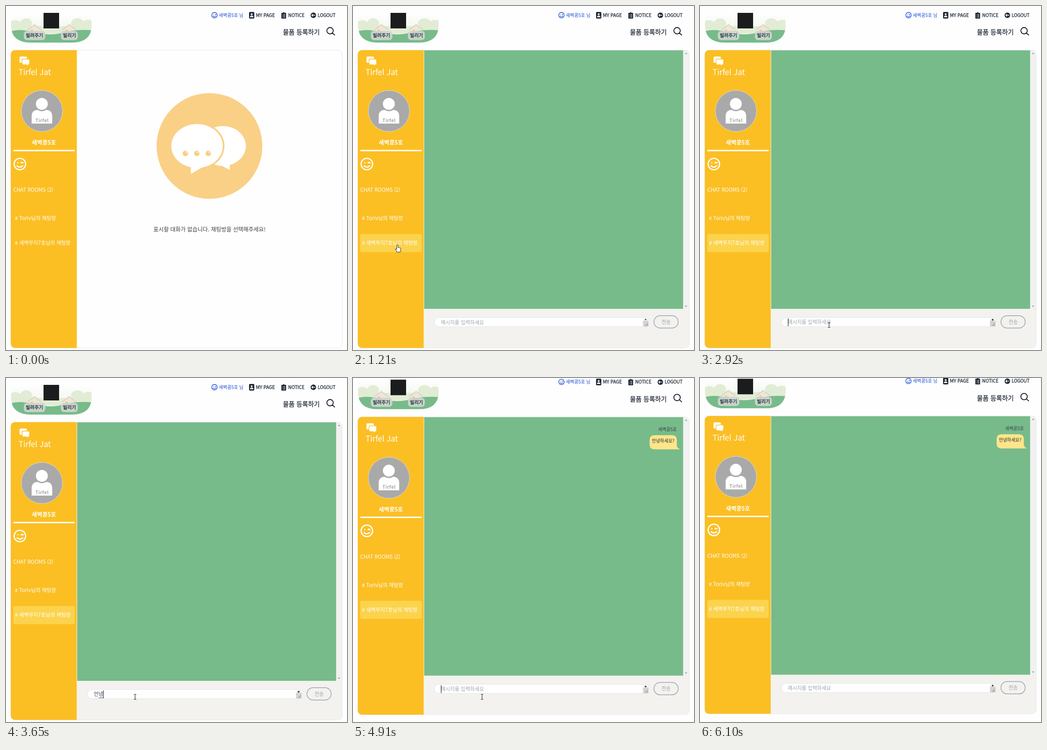
Recreate the animation shown at these times as an HTML page. Size 745 by 752 pixels, loop 8 s.

```html
<!DOCTYPE html>
<html lang="ko">
<head>
<meta charset="utf-8">
<title>Chat room</title>
<style>
html, body { margin: 0; width: 100%; height: 100%; overflow: hidden; background: #fefefe; }
svg { display: block; width: 100vw; height: 100vh; }
text { font-family: "Noto Sans CJK KR", "Noto Sans KR", sans-serif; white-space: pre; }
.medium { fill: #1f2937; stroke: #1f2937; stroke-width: .3px; }
.nav { font-size: 10px; }
.tab { font-size: 10.3px; text-anchor: middle; }
.side { font-size: 11.2px; fill: #fff; }
.field { font-size: 11px; }
.line { fill: none; stroke-linecap: round; stroke-linejoin: round; }
</style>
</head>
<body>
<svg viewBox="0 0 745 752">
  <defs>
    <clipPath id="banner"><path d="M11 15H187V44Q186 80 143 80H55Q12 80 11 44Z"/></clipPath>
    <clipPath id="card"><rect x="10.5" y="96.5" width="723.5" height="651" rx="9"/></clipPath>
    <linearGradient id="sky" x2="0" y2="1">
      <stop offset="0" stop-color="#fefefe"/><stop offset="1" stop-color="#e9f2dd"/>
    </linearGradient>
    <g id="house">
      <path d="M-11 10V0L0-8 11 0V10Z" fill="#f0e6d6"/>
      <path d="M-15 1 0-10 15 1" fill="none" stroke="#ddd5c8" stroke-width="2.5"/>
      <rect x="-8" y="1" width="5" height="5" fill="#f3c08d"/>
    </g>
    <g id="wink" class="line">
      <circle r="12.5"/>
      <path d="M-6 4Q0 9.2 6 4M2.6-2.6Q4.8-4.4 7-2.6M-4.4-3v.3"/>
    </g>
    <path id="arrow" d="M0 0V16.2L3.8 12.6 6.2 18.2 8.6 17.2 6.2 11.7H11.5Z" fill="#fff" stroke="#111"/>
    <path id="hand" d="M-1.4 9.5V1.2a1.4 1.4 0 0 1 2.8 0V6.2q1.2-.8 2.2.3q1.2-.6 2.1.5q1.6-.4 1.6 1.4V12q0 2-1.3 4H-.8q-.5-2-3.5-5.3q-1-1.5.2-1.9q1.2-.2 2.7 1.6z" fill="#fff" stroke="#222"/>
    <path id="beam" d="M-2.8-5.5H-.8L0-5 .8-5.5H2.8M0-5V5M-2.8 5.5H-.8L0 5 .8 5.5H2.8" fill="none" stroke="#333" stroke-width="1.2"/>
  </defs>

  <g id="page">
    <!-- header -->
    <g clip-path="url(#banner)">
      <rect x="11" y="17" width="176" height="63" fill="url(#sky)"/>
      <g fill="#e2ecd5">
        <ellipse cx="20" cy="42" rx="14" ry="11"/><ellipse cx="44" cy="38" rx="13" ry="11"/>
        <ellipse cx="156" cy="38" rx="14" ry="11"/><ellipse cx="179" cy="42" rx="13" ry="12"/>
        <rect x="11" y="44" width="176" height="16"/>
      </g>
      <use href="#house" x="62" y="51"/><use href="#house" x="138" y="51"/>
      <path d="M11 55Q30 49 60 57T118 60Q150 50 187 53V80H11Z" fill="#77bb8a"/>
    </g>
    <rect x="82" y="15" width="34" height="34" fill="#1b1c1e"/>
    <g fill="#cfd5d0" fill-opacity=".92">
      <rect x="39" y="54.5" width="47" height="20" rx="7"/><rect x="120" y="54.5" width="37" height="20" rx="7"/>
    </g>
    <text class="tab medium" x="62.3" y="68">빌려주기</text>
    <text class="tab medium" x="138.7" y="68">빌리기</text>

    <use href="#wink" transform="translate(455.5 20) scale(.48)" stroke="#1d4ed8" stroke-width="2.8"/>
    <text class="nav" x="465" y="23.7" font-weight="500" fill="#1d4ed8" style="font-size:9.9px">새벽콩5호 님</text>
    <rect x="531" y="13" width="11.5" height="14.5" rx="2" fill="#1f2937"/>
    <circle cx="536.7" cy="18" r="2.1" fill="#fff"/><path d="M533 24.5q0-3.6 3.7-3.6t3.7 3.6z" fill="#fff"/>
    <text class="nav medium" x="546" y="23.7" style="font-size:10.2px">MY PAGE</text>
    <path d="M602.5 15H605Q606.8 11.5 608.6 15H611q1 0 1 1V26.5q0 1-1 1H602.5q-1 0-1-1V16q0-1 1-1Z" fill="#1f2937"/>
    <path d="M603.5 18.7h1M606 18.7h4M603.5 21.5h1M606 21.5h4M603.5 24.3h1M606 24.3h4" stroke="#fff"/>
    <text class="nav medium" x="616.5" y="23.7">NOTICE</text>
    <circle cx="671.5" cy="20.3" r="6" fill="#1f2937"/>
    <path d="M675 20.3H668M670.3 18 668 20.3 670.3 22.6" class="line" stroke="#fff" stroke-width="1.4"/>
    <text class="nav medium" x="681" y="23.7" style="font-size:9.7px">LOGOUT</text>
    <text class="medium" x="605" y="62" font-size="13.9">물품 등록하기</text>
    <path d="M715 54a7 7 0 1 0-14 0a7 7 0 1 0 14 0M713.2 59 718 63.5" class="line" stroke="#111827" stroke-width="1.8"/>

    <!-- card -->
    <rect x="10.5" y="96.5" width="724" height="651" rx="9" fill="#fefefe" stroke="#e5e7eb"/>
    <g clip-path="url(#card)">
      <rect x="10" y="96" width="144.7" height="652" fill="#fbbf24"/>
      <g id="room">
        <rect x="154.7" y="97" width="580" height="650" fill="#f3f2ee"/>
        <rect x="155.5" y="97" width="566" height="565" fill="#77bb8a"/>
        <rect x="721.5" y="97" width="13" height="565" fill="#f1f1f1"/>
        <path d="M725 105 727.7 102 730.4 105ZM725 655 727.7 658 730.4 655Z" fill="#9a9a9a"/>
        <g id="message">
          <text x="707.5" y="127" font-size="9.7" fill="#374151" text-anchor="end">새벽콩5호</text>
          <path d="M659 136.5H696.5Q707.5 136.5 707.5 147.5V160Q709 165 714.5 167.5H659Q648 167.5 648 156.5V147.5Q648 136.5 659 136.5Z" fill="#fde58a"/>
          <text x="653" y="152" font-size="9.7" fill="#1f2937">안녕하세요?</text>
        </g>
        <path d="M645 681H188a10 10 0 0 0 0 20H645Z" fill="#fff" stroke="#e3e5e8"/>
        <rect x="633.5" y="681.5" width="12" height="7" fill="#f6f6f6"/>
        <rect x="633.5" y="688" width="12" height="12.5" fill="#d3d3d3"/>
        <path d="M638 699.5 644.5 693M641.5 699.5 644.5 696.5" stroke="#777"/>
        <path d="M636.8 686.2 639.4 683.6 642 686.2Z" fill="#333"/>
        <path id="down" d="M636.8 685.8 639.4 688 642 685.8Z" fill="#333"/>
        <g id="entry">
          <text id="hint" class="field" x="192" y="696" fill="#9ca3af">메시지를 입력하세요</text>
          <text id="typed" class="field" x="192" y="696" fill="#374151"></text>
          <rect id="under" y="699.6" height="1" fill="#374151"/>
          <rect id="caret" y="684" width="1.1" height="17" fill="#111"/>
        </g>
        <rect x="657.5" y="677" width="53" height="27" rx="13.5" fill="none" stroke="#9ca3af" stroke-width="1.5"/>
        <text class="field" x="684" y="694.7" fill="#9ca3af" text-anchor="middle">전송</text>
      </g>
      <g id="empty">
        <circle cx="444.5" cy="306" r="115.5" fill="#f9d086"/>
        <ellipse cx="474" cy="306" rx="50" ry="43.5" fill="#fff"/>
        <path d="M455 346 489 345V358.5L473 350Z" fill="#fff"/>
        <ellipse cx="417.3" cy="306" rx="58" ry="49.8" fill="none" stroke="#f9d086" stroke-width="4"/>
        <path d="M404 348V367L432 351Z" fill="#fff"/>
        <ellipse cx="417.3" cy="306" rx="56.3" ry="48" fill="#fff"/>
        <g id="dots"></g>
        <text x="322" y="492.8" font-size="12.2" fill="#3f3f46">표시할 대화가 없습니다. 채팅방을 선택해주세요!</text>
      </g>
      <rect id="pick" x="16" y="498.5" width="134" height="39.5" rx="3" fill="#fcd34d"/>
    </g>

    <!-- sidebar -->
    <rect x="29.5" y="110.5" width="16" height="13.5" rx="2.5" fill="#fff"/>
    <path d="M37.5 116H49q2.5 0 2.5 2.5V126q0 2.5-2.5 2.5H48.3V132L44.5 128.5H37.5Q35 128.5 35 126V118.5Q35 116 37.5 116Z" fill="#fff" stroke="#fbbf24" stroke-width="1.3"/>
    <text x="27.5" y="150.6" font-size="17" fill="#fff">Tirfel Jat</text>
    <circle cx="78.5" cy="229.5" r="45" fill="#a9a9a9" stroke="#dcdcdc"/>
    <circle cx="78.3" cy="214" r="13" fill="#fff"/>
    <path d="M56 257V241Q56 228 69 227.3Q78.5 233 88 227.3Q101 228 101 241V257Z" fill="#fff"/>
    <text x="78.8" y="253.5" font-size="10" font-weight="700" letter-spacing=".5" fill="#a3a3a3" text-anchor="middle">Tirfel</text>
    <text x="82.8" y="303.2" font-size="12.4" font-weight="700" fill="#fff" text-anchor="middle">새벽콩5호</text>
    <rect x="16" y="314.5" width="134" height="3" fill="#fff"/>
    <use href="#wink" x="30.3" y="345.5" stroke="#fff" stroke-width="2.7"/>
    <text class="side" x="16" y="406">CHAT ROOMS (2)</text>
    <text class="side" x="19.5" y="468.2"># Toriv님의 채팅방</text>
    <text class="side" x="19.5" y="522.2"># 새벽무지7호님의 채팅방</text>
  </g>
  <use id="cursor"/>
</svg>

<script>
const LOOP = 8000, OPEN = 1210, FIRST_KEY = 2390, COMMIT = 4640, SEND = 4840;
const $ = id => document.getElementById(id);

// Each row: start time, then the state held until the next row.
const cursorSteps = [
  [0, ''],
  [340, 'arrow', 484, 722], [410, 'arrow', 452, 700], [480, 'arrow', 396, 664],
  [550, 'arrow', 322, 622], [610, 'arrow', 246, 584], [680, 'arrow', 176, 552],
  [750, 'arrow', 124, 528], [820, 'hand', 93, 511], [880, 'hand', 80, 501],
  [950, 'hand', 78, 500], [1020, 'hand', 87, 507], [1140, 'hand', 97, 522],
  [1470, 'arrow', 118, 538], [1540, 'arrow', 165, 578], [1600, 'arrow', 220, 630],
  [1670, 'arrow', 258, 672], [1730, 'beam', 278, 694], [2000, 'beam', 280, 696],
  [2130, 'beam', 282, 697], [5440, 'arrow', 147, 690], [5510, '']
];
const typingSteps = [
  [0, ''], [FIRST_KEY, 'ㅇ'], [2850, ''], [3180, 'ㅇ'], [3250, '아'], [3380, '안'],
  [3520, '안ㄴ'], [3590, '안녀'], [3650, '안녕'], [3780, '안녕ㅎ'], [3910, '안녕하'],
  [4110, '안녕하ㅅ'], [4180, '안녕하세'], [4250, '안녕하세요'],
  [COMMIT, '안녕하세요?'], [SEND, '']
];
const caretSteps = [[0, false], [1930, true], [5180, false], [5700, true], [6100, false]];
const scrollSteps = [[0, 0], [SEND, -5], [4910, -11.4], [4970, -13.4]];

const at = (steps, t) => steps.findLast(step => step[0] <= t);
const show = (id, on) => $(id).setAttribute('visibility', on ? 'inherit' : 'hidden');
const set = (id, attrs) => {
  for (const name in attrs) $(id).setAttribute(name, attrs[name]);
};

$('dots').innerHTML = [392, 417, 442].map(x =>
  `<circle cx="${x}" cy="322.3" r="6" fill="#f9d086"/>
   <circle cx="${x + 2.6}" cy="319.6" r="1.5" fill="#fff"/>`).join('');

function drawEntry(t) {
  const text = at(typingSteps, t)[1];
  const typed = $('typed');
  if (typed.textContent !== text) typed.textContent = text;
  const width = text ? typed.getComputedTextLength() : 0;
  const last = text ? width / text.length : 0;
  show('hint', !text);
  show('under', text && t < COMMIT);
  set('under', { x: 192 + width - last, width: last });
  show('caret', at(caretSteps, t)[1]);
  set('caret', { x: 192 + width });
  set('entry', { transform: `translate(0 ${t < FIRST_KEY ? 0 : -1})` });
  show('down', t >= FIRST_KEY);
}

function draw(t) {
  $('empty').style.display = t < OPEN ? '' : 'none';
  $('room').style.display = t < OPEN ? 'none' : '';
  show('pick', t >= OPEN);
  show('message', t >= SEND);
  if (t >= OPEN) drawEntry(t);
  set('page', { transform: `translate(0 ${at(scrollSteps, t)[1]})` });

  const [, shape, x, y] = at(cursorSteps, t);
  show('cursor', shape);
  if (shape) set('cursor', { href: '#' + shape, x, y });
}

const start = performance.now();
function frame() {
  draw((performance.now() - start) % LOOP);
  requestAnimationFrame(frame);
}
frame();
</script>
</body>
</html>
```
